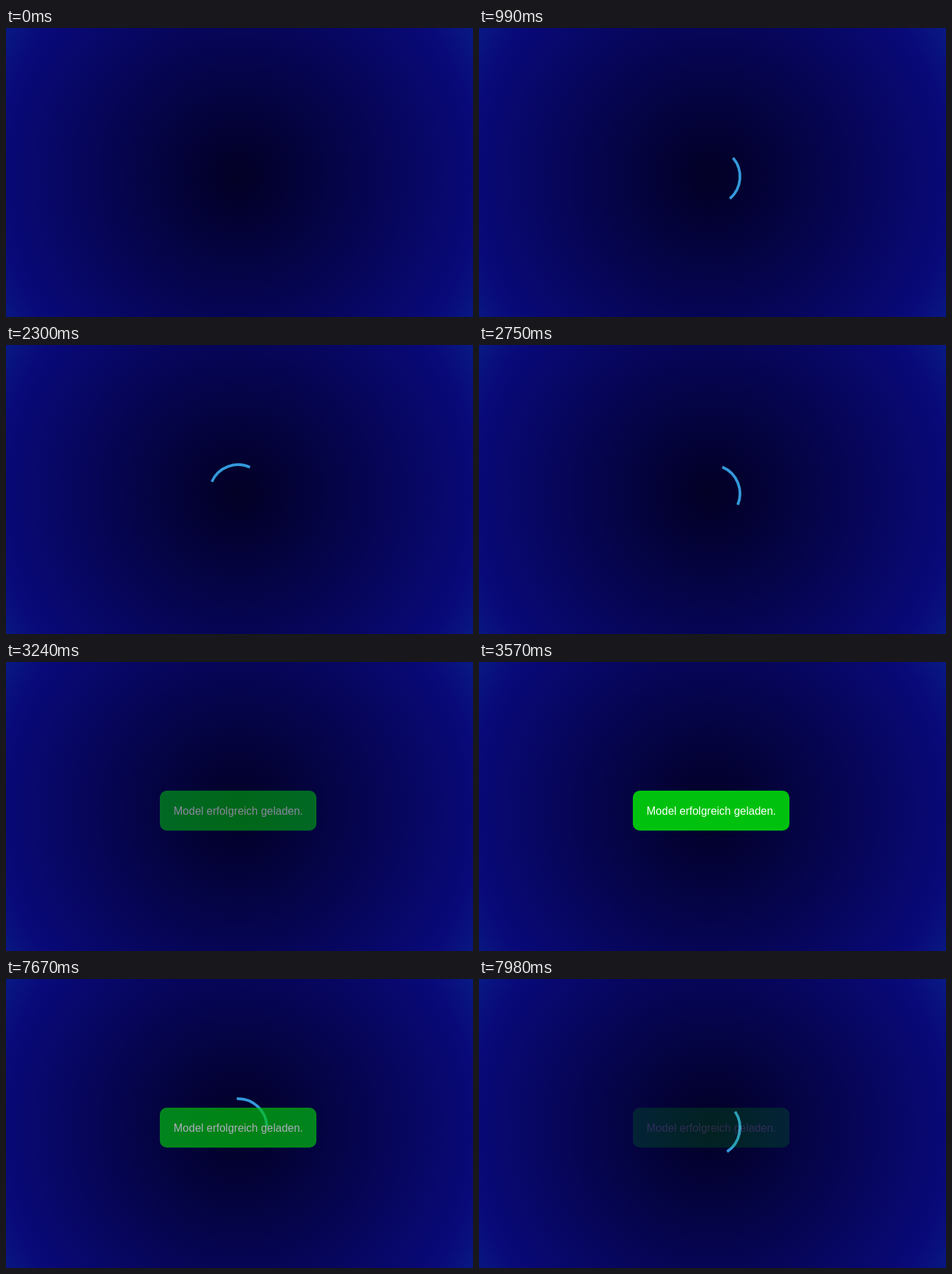
Write an HTML page that moves like this. It is 680 px wide and 420 px high and loops after 8000 ms.

```html
<!DOCTYPE html>
<html lang="de">
<head>
<meta charset="utf-8">
<title>Loader</title>
<style>
  html, body { margin: 0; width: 100%; height: 100%; overflow: hidden; background: #020024; }
  svg { display: block; width: 680px; height: 420px; }
  text { font: 16px "Liberation Sans", Arial, sans-serif; fill: #fff; }
</style>
</head>
<body>
<svg viewBox="0 0 680 420">
  <defs>
    <radialGradient id="sky" gradientUnits="userSpaceOnUse" cx="338" cy="216" r="1000">
      <stop offset="0" stop-color="rgb(2,0,36)"/>
      <stop offset=".35" stop-color="rgb(9,9,121)"/>
      <stop offset="1" stop-color="rgb(0,212,255)"/>
    </radialGradient>
  </defs>
  <rect width="680" height="420" fill="url(#sky)"/>
  <path id="arc" d="M-29.7 -29.7A42 42 0 0 1 29.7 -29.7" fill="none" stroke="#3498db" stroke-width="4"/>
  <g id="toast">
    <rect x="224" y="187" width="228" height="58" rx="10" fill="#00c20e"/>
    <text x="244" y="222">Model erfolgreich geladen.</text>
  </g>
</svg>
<script>
const LOOP = 8000, LOAD = 500, DONE = 3095, RELOAD = 7450;
const FADE_IN = 465, FADE_OUT = 1000;
const arc = document.getElementById('arc');
const toast = document.getElementById('toast');

// [time, degrees] of the spinner
const firstSpin = [[500, 2], [990, 94.7], [1870, 257], [2750, 428], [3570, 583]];
const secondSpin = [[7450, 3], [7980, 101.5]];

function lerpKeys(keys, t) {
  let i = 1;
  while (i < keys.length - 1 && t > keys[i][0]) i++;
  const [t0, a] = keys[i - 1], [t1, b] = keys[i];
  return a + (b - a) * (t - t0) / (t1 - t0);
}

// CSS "ease": cubic-bezier(.25, .1, .25, 1)
function ease(x) {
  if (x <= 0) return 0;
  if (x >= 1) return 1;
  const bez = (s, p, q) => 3 * p * s * (1 - s) ** 2 + 3 * q * s * s * (1 - s) + s ** 3;
  let lo = 0, hi = 1;
  for (let i = 0; i < 24; i++) {
    const mid = (lo + hi) / 2;
    if (bez(mid, .25, .25) < x) lo = mid; else hi = mid;
  }
  return bez(lo, .1, 1);
}

// the picture refreshes in fixed ticks
const tick = (t, start, step) => start + Math.floor((t - start) / step) * step;

function draw(time) {
  let t = time % LOOP;
  const again = t >= RELOAD;
  if (again) t = tick(t, RELOAD, 35.3);
  else if (t >= LOAD) t = tick(t, LOAD, 32.6);

  const spinning = again || (t >= LOAD && t < DONE);
  arc.style.display = spinning ? '' : 'none';
  if (spinning) {
    const angle = lerpKeys(again ? secondSpin : firstSpin, t);
    arc.setAttribute('transform', `translate(338 216) rotate(${angle.toFixed(2)})`);
  }
  const alpha = again ? 1 - ease((t - RELOAD) / FADE_OUT) : ease((t - DONE) / FADE_IN);
  toast.setAttribute('opacity', alpha.toFixed(3));
}

let begin = null;
function loop(now) {
  if (begin === null) begin = now;
  draw(now - begin);
  requestAnimationFrame(loop);
}
draw(0);
requestAnimationFrame(loop);
</script>
</body>
</html>
```
